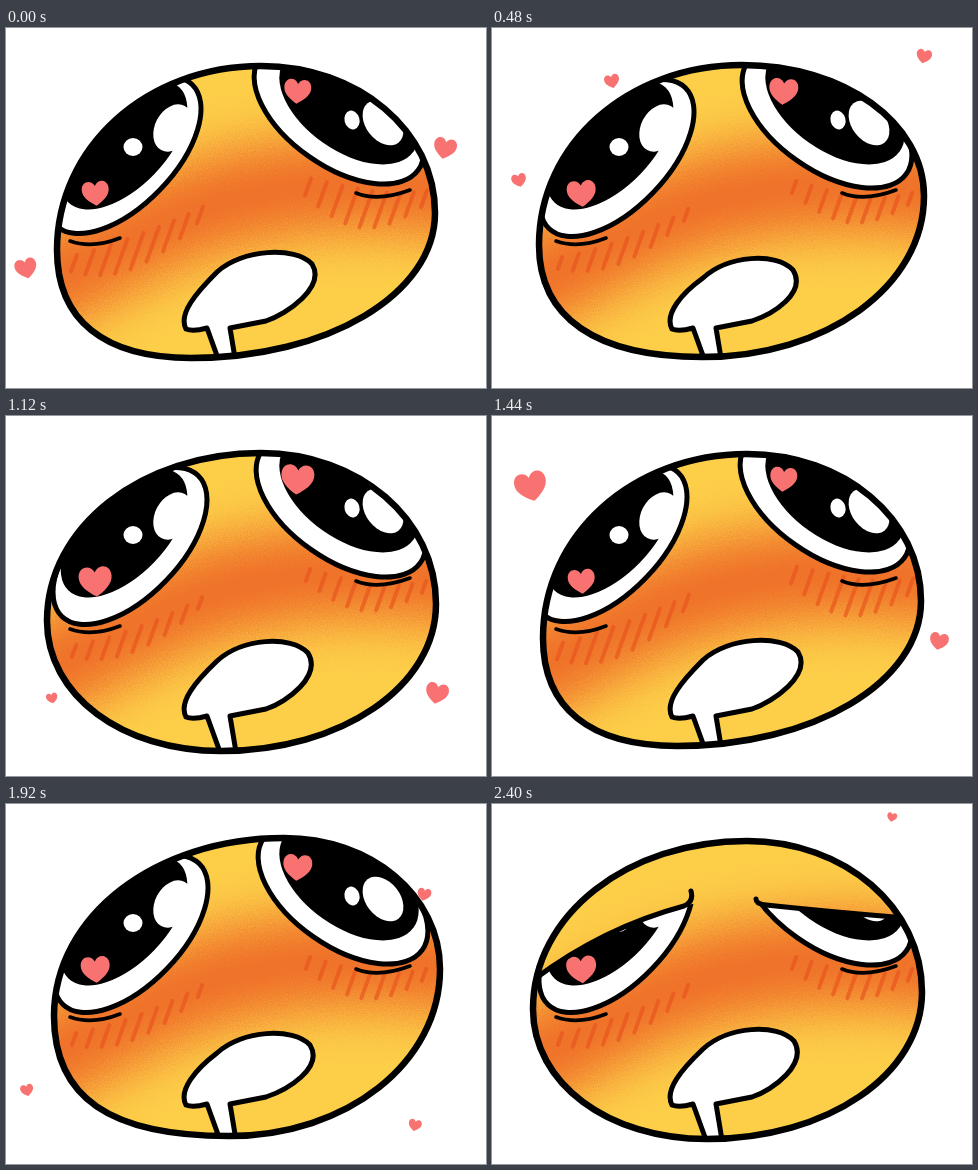
Animation of 480 by 360 pixels, one loop 2.56 s. Source, as an HTML page:

```html
<!DOCTYPE html>
<html lang="en">
<head>
<meta charset="utf-8">
<style>
  html, body { margin: 0; width: 100%; height: 100%; overflow: hidden; background: #fff; }
  svg { display: block; width: 100vw; height: 100vh; }
  .ink { stroke: #000; stroke-width: 5; stroke-linejoin: round; stroke-linecap: round; }
  .outline { stroke-width: 6.5; }
  .line { fill: none; }
  .white { fill: #fff; }
  .heart { fill: #f87272; }
  .bag { fill: none; stroke: #000; stroke-width: 3.6; stroke-linecap: round; }
  .hatch { fill: none; stroke: #e9531c; stroke-width: 4; stroke-linecap: round; opacity: .65; }
  .blush { fill: none; stroke: #ee6d28; stroke-width: 92; filter: url(#airbrush); }
</style>
</head>
<body>
<svg viewBox="0 0 480 360">
  <defs>
    <filter id="airbrush" filterUnits="userSpaceOnUse" x="-80" y="-20" width="640" height="420" color-interpolation-filters="sRGB">
      <feGaussianBlur stdDeviation="26" result="soft"/>
      <feTurbulence type="fractalNoise" baseFrequency=".75" numOctaves="2" seed="4"/>
      <feDisplacementMap in="soft" scale="28" xChannelSelector="R" yChannelSelector="G"/>
    </filter>
    <clipPath id="lids"><path d="M40 177Q110 124 200 100L262 98Q340 108 414 114L480 130V360H0Z"/></clipPath>
    <path id="heart" d="M0 .95C-.5 .65-1 .25-1-.25C-1-.95-.25-1.05 0-.52C.25-1.05 1-.95 1-.25C1 .25 .5 .65 0 .95Z"/>
  </defs>
  <g id="floating"></g>
  <g id="faces"></g>
</svg>
<script>
const STEP = 160, STEPS = 16;

const heart = (x, y, r, tilt) =>
  `<use href="#heart" class="heart" transform="translate(${x} ${y}) rotate(${tilt}) scale(${r})"/>`;
const oval = (style, x, y, rx, ry, tilt) =>
  `<ellipse class="${style}" rx="${rx}" ry="${ry}" transform="translate(${x} ${y}) rotate(${tilt})"/>`;

// Egg through its top, right, bottom and left extremes; corner swells the lower left
function egg([tx, ty], [rx, ry], [bx, by], [lx, ly], corner) {
  const arc = (x0, y0, x1, y1, upright, k = .56) => {
    const h = x0 + (x1 - x0) * k, v = y0 + (y1 - y0) * k;
    const back = 1 - k, h2 = x0 + (x1 - x0) * back, v2 = y0 + (y1 - y0) * back;
    return upright ? `C${x0} ${v} ${h2} ${y1} ${x1} ${y1}` : `C${h} ${y0} ${x1} ${v2} ${x1} ${y1}`;
  };
  return `M${tx} ${ty}` + arc(tx, ty, rx, ry, false) + arc(rx, ry, bx, by, true)
    + arc(bx, by, lx, ly, false, corner) + arc(lx, ly, tx, ty, true) + 'Z';
}

const mouth = (right, top) => `<path class="ink white" d="M180 301C172 286 190 265 211 ${top + 21}
  C236 ${top - 2} ${right - 22} ${top - 5} ${right - 5} ${top + 13}
  C${right + 9} ${top + 36} 281 286 260 293L224 300L230 336H214L201 300Q187 304 180 301Z"/>`;

// Slanted blush strokes along two curves, longest in the middle of each row
function hatch(stretch) {
  let d = '';
  const stroke = (x, y, u) => {
    const h = (6 + 7 * Math.sin(Math.PI * u)) * stretch, w = h * .36;
    d += `M${x - w} ${y + h}L${x + w} ${y - h}`;
  };
  for (let u = 0; u <= 1; u += .125) {
    stroke(68 + 126 * u, 235 - 48 * u * u, u);
    stroke(302 + 116 * u, 159 + 23 * Math.sin(2.6 * u), u);
  }
  return `<path class="hatch" d="${d}"/>`;
}

function eyes({ left: [lx, ly], right: [rx, ry], love }) {
  const leftEye = [125 + lx, 130 + ly, 98, 50, -46], rightEye = [335 + rx, 90 + ry, 97, 52, 35];
  return oval('white', ...leftEye) + oval('', 118, 117, 80, 42, -46)
    + oval('white', 167, 100, 18, 25, 28) + oval('white', 127, 119, 9.5, 9, 0)
    + oval('ink line', ...leftEye)
    + oval('white', ...rightEye) + oval('', 343, 78, 79, 45, 35)
    + oval('white', 377, 95, 17, 25, -38) + oval('white', 346, 92, 7.5, 9.5, -15)
    + oval('ink line', ...rightEye)
    + heart(89.5, 165, love, -5) + heart(291.5, 63, love, 5);
}

const lids = '<path class="ink line" d="M40 177Q110 124 192 102Q202 98 199 87M264 95Q264 100 274 101Q340 108 414 114"/>';

const poses = [
  { body: [[255, 38], [429, 185], [185, 330], [51, 222], .65], left: [-7, -3], right: [-2, -4], love: 13.5, lip: [311, 223], stretch: 1.4 },
  { body: [[250, 37], [432, 168], [210, 329], [47, 217], .65], left: [0, 0], right: [0, 0], love: 14.5, lip: [306, 229], stretch: 1 },
  { body: [[278, 34], [434, 165], [223, 332], [48, 212], .68], left: [0, 0], right: [2, 0], love: 14.5, lip: [309, 228], stretch: 1 },
  { body: [[255, 37], [430, 188], [215, 335], [41, 205], .57], left: [-1, 0], right: [0, 1], love: 16.5, lip: [307, 224], stretch: 1 }
];
poses.push({ ...poses[3], love: 15, sleepy: true });

const faces = document.getElementById('faces');
faces.innerHTML = poses.map((p, i) => {
  const body = egg(...p.body);
  return `<g>
    <clipPath id="clip${i}"><path d="${body}"/></clipPath>
    <g clip-path="url(#clip${i})">
      <path d="${body}" fill="#fdcf49"/>
      <path class="blush" d="M-30 282C70 252 130 192 230 170S380 154 510 168"/>
      ${hatch(p.stretch)}
      ${p.sleepy ? `<g clip-path="url(#lids)">${eyes(p)}</g>${lids}` : eyes(p)}
      <path class="bag" d="M64 213Q86 221 114 210M350 165Q372 174 404 162"/>
      ${mouth(...p.lip)}
    </g>
    <path class="ink line outline" d="${body}"/>
  </g>`;
}).join('');

// Rising hearts: they sway sideways and shrink on the way from one point to the other
const rising = [
  { born: 0, life: 4, from: [20, 240], to: [27, 152], size: 11, sway: -8 },
  { born: 0, life: 4, from: [439, 120], to: [432, 28], size: 11.5, sway: 12 },
  { born: 3, life: 3, from: [120, 53], to: [111, 12], size: 7.5, sway: 0 },
  { born: 5, life: 3, from: [51, 325], to: [46, 282], size: 8.5, sway: -5 },
  { born: 6, life: 5, from: [423, 303], to: [455, 199], size: 12.5, sway: 0 },
  { born: 8, life: 4, from: [50, 92], to: [22, 26], size: 18, sway: -2 },
  { born: 11, life: 5, from: [428, 116], to: [400, 13], size: 7.5, sway: -4 },
  { born: 12, life: 2, from: [21, 286], to: [20, 262], size: 6.5, sway: 0 },
  { born: 12, life: 2, from: [409, 321], to: [407, 300], size: 6.5, sway: 0 }
];
const floating = document.getElementById('floating');

function show(step) {
  // Each drawing is held for two steps; the last one has drooping lids
  const drawing = step >> 1, pose = drawing === 7 ? 4 : drawing % 4;
  [...faces.children].forEach((g, i) => g.style.display = i === pose ? '' : 'none');
  floating.innerHTML = rising.map(({ born, life, from, to, size, sway }) => {
    const u = (step - born) / (life - 1);
    if (u < 0 || u > 1) return '';
    const [x, y] = from.map((v, i) => v + (to[i] - v) * u);
    return heart(x + sway * Math.sin(Math.PI * u), y, size * (1 - .33 * u), x < 240 ? -14 : 12);
  }).join('');
}

const start = performance.now();
let shown = -1;
function tick() {
  const step = Math.floor((performance.now() - start) / STEP) % STEPS;
  if (step !== shown) show(shown = step);
  requestAnimationFrame(tick);
}
tick();
</script>
</body>
</html>
```
